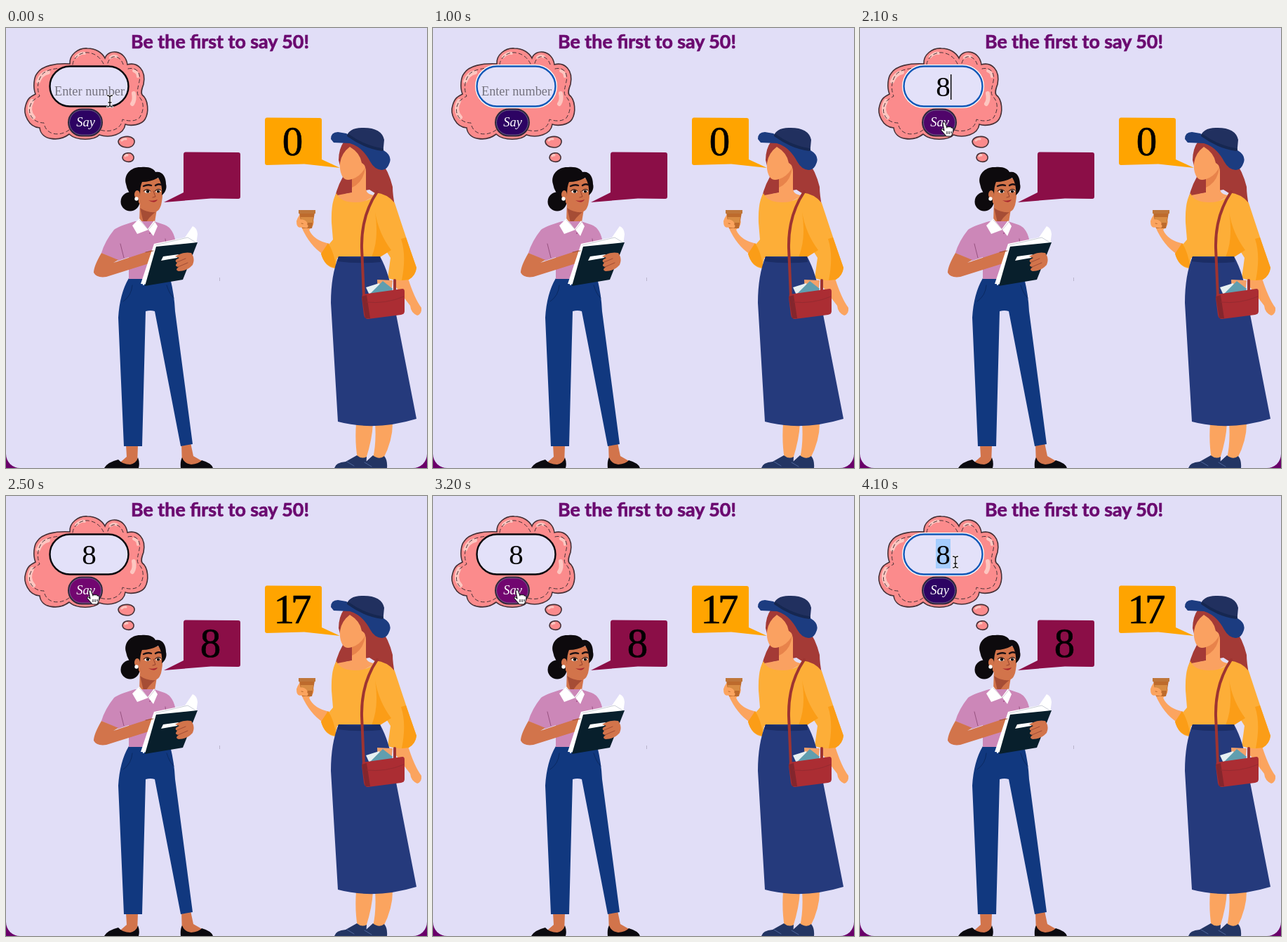
An HTML page for the animation above (4.2 s loop, 600 by 626 pixels).

```html
<!DOCTYPE html>
<html lang="en">
<head>
<meta charset="utf-8">
<title>Be the first to say 50!</title>
<style>
html, body { margin: 0; width: 100%; height: 100%; overflow: hidden; background: #6a006a; }
svg { display: block; width: 100vw; height: 100vh; }
text { text-anchor: middle; font-family: "Liberation Serif", "Times New Roman", serif; }
.title { font: 700 26.8px Lato, sans-serif; fill: #6b0a70; stroke: #6b0a70; stroke-width: .7px; }
.big { font-size: 59px; letter-spacing: -5px; stroke: #000; stroke-width: .6px; }
.line { fill: none; stroke-linecap: round; stroke-linejoin: round; }
</style>
</head>
<body>
<svg viewBox="0 0 600 626" preserveAspectRatio="none">
  <rect y="-30" width="600" height="656" rx="20" fill="#e1def7"/>
  <text class="title" x="305" y="29">Be the first to say 50!</text>
  <path d="M304.5 355v5" stroke="#b9b5cc"/>

  <g id="cloud" stroke="#453036" stroke-width="1.6" fill="#fb8b8c">
    <path d="M91 51C90 38 103 28 116 29C128 29 137 35 141 43C146 29 170 31 173 52C188 48 200 60 196 80C193 88 192 92 194 95C203 102 204 120 198 130C193 138 178 140 170 137C168 152 148 157 133 152C126 160 101 161 90 151C76 162 50 160 48 142C32 141 24 122 28 110C31 99 36 97 42 94C38 84 40 70 44 65C51 53 72 50 91 51Z"/>
    <path d="M160 161C162 154 176 152 182 158C185 163 181 170 173 170C165 170 160 166 160 161Z"/>
    <path d="M166 184C167 177 179 175 182 183C183 190 176 191 172 190C168 189 166 187 166 184Z"/>
    <g class="line" stroke="#fdc6c0" stroke-width="6">
      <path d="M46 76q4-11 14-13M37 104q-7 13 2 23M182 93q2 9-2 15"/>
      <path d="M100 41q6-6 12-5M149 42q4-4 9-1M182 61q6 2 6 8" stroke-width="4"/>
      <path d="M165 160q3-3 6-2M170 182q2-2 3-1" stroke-width="3"/>
    </g>
    <path class="line" stroke-width="1" stroke-dasharray="5 4" d="M95 52C96 42 106 34 117 35C126 36 134 41 139 51M145 50C149 36 164 38 168 55M174 58C186 55 194 64 189 80C187 90 186 94 190 98C198 107 196 119 190 128C184 133 175 133 166 130C164 145 148 149 134 145M90 145C78 154 57 154 54 135C39 135 31 123 34 112C36 104 42 100 48 97C43 85 46 75 50 68C56 59 70 57 87 57"/>
  </g>

  <rect id="ring" x="61" y="53" width="115" height="60" rx="30" fill="none" stroke="#fff" stroke-width="2"/>
  <rect id="field" x="62.5" y="54.5" width="112" height="57" rx="28.5" fill="#e3e1f9" stroke-width="2.4"/>
  <rect id="mark" x="108" y="61" width="21" height="42" fill="#a5cdfd"/>
  <text id="hint" x="119" y="96" font-size="18.3" fill="#75737f">Enter number</text>
  <text id="typed" x="118.5" y="97" font-size="41">8</text>
  <rect id="caret" y="66" width="1.4" height="36"/>
  <rect id="button" x="89" y="115.5" width="48" height="38" rx="19" stroke="#302a3c" stroke-width="2"/>
  <rect x="90.5" y="117" width="45" height="35" rx="17.5" fill="none" stroke="#77718d" stroke-width=".8"/>
  <text x="113.5" y="140" font-size="18.5" font-style="italic" fill="#fff">Say</text>

  <path fill="#8b0e47" d="M256 176.5L331 177Q334 177 334 180V240Q334 243 331 243L292 242.500L225 248L253 234V180Q253 176.500 256 176.500Z"/>
  <path fill="#ffa400" d="M372 127.500L447 128Q450 128 450 131V187L476 199L425 193.500L372 195Q369 195 369 192V131Q369 127.500 372 127.500Z"/>
  <text id="mine" class="big" x="289" y="229">8</text>
  <text id="theirs" class="big" x="406" y="181">0</text>

  <g id="reader">
    <path fill="#d2744b" d="M171 593H188L187 622H158L172 610ZM250 591L263 590L267 609L281 617L268 623H251Z"/>
    <path fill="#0b0a0f" d="M140 626Q144 618 160 614Q166 621 177 621Q186 619 188 611Q191 619 189 626ZM249 626Q248 616 251 611Q254 620 264 621Q275 620 279 615Q293 619 295 626Z"/>
    <path fill="#11387f" d="M175 356H234Q240 380 241 403L266 592L249 595L212 403Q206 401 199 403L194 595H168L160 412Q162 378 175 356Z"/>
    <path class="line" stroke="#0b2961" d="M180 366Q179 381 167 389M229 366Q233 379 239 384"/>

    <circle cx="177" cy="247" r="13.500" fill="#0d0a0d"/>
    <path fill="#d2744b" d="M191 244L190 277Q200 291 212 276L215 258Z"/>
    <path fill="#a64d35" d="M191 256Q201 263 213 262Q204 268 197 281Z"/>
    <path fill="#d2744b" d="M188 223Q195 211 220 214Q225 231 222 247Q220 262 210 262Q195 260 189 248Z"/>
    <path fill="#0d0a0d" d="M171 222C167 208 179 197 193 198C205 197 211 201 213 205C223 203 228 212 228 222C230 229 226 235 222 238C223 228 221 219 217 213Q206 219 194 219Q191 225 191 238L185 244Q173 235 171 222Z"/>
    <ellipse cx="187" cy="237" rx="4" ry="6" fill="#d2744b"/>
    <circle cx="186" cy="243" r="2.700" fill="#fff"/>
    <path class="line" stroke="#1c1014" stroke-width="2.400" d="M196 225Q202 222 207 224M213 224Q217 221 221 223"/>
    <path fill="#fff" d="M197 233q5-5 9 0q-5 4-9 0M213 233q4-5 8-1q-4 4-8 1"/>
    <circle cx="202" cy="232.500" r="2.200"/><circle cx="217" cy="232.500" r="2.100"/>
    <path class="line" stroke="#1c1014" d="M196 232q5-5 10 0M212 232q5-5 9-1"/>
    <path class="line" stroke="#96422d" d="M210 232l3 8l-4 1"/>
    <path fill="#a9272f" d="M203 245Q209 247 216 244Q212 251 203 245Z"/>

    <path fill="#cc87b8" d="M184 275Q160 282 154 287Q141 303 136 320L160 331L175 326V357H234L239 331L242 306Q239 285 226 280L211 275Z"/>
    <path class="line" stroke="#96517f" d="M163 307L168 327M227 300L228 307"/>
    <path fill="#d2744b" d="M136 320L160 330L153 334L202 318Q213 313 214 321L210 333L143 354Q129 356 125 348Q125 339 136 320Z"/>
    <path fill="#fff" d="M190 271L180 281L187 293L203 287L210 296L216 282L211 274L202 286Z"/>
    <path class="line" stroke="#c8bac8" stroke-width=".8" d="M190 273L203 287L212 276"/>
    <circle cx="205" cy="292" r="1" fill="#a4558b"/>
    <path fill="#fff" d="M211 307L255 298L266 282Q272 284 273 293L271 309L205 365L192 364Z"/>
    <path class="line" stroke="#bcc1cc" stroke-width=".8" d="M213 309L259 298L272 306"/>
    <path fill="#081f2c" d="M214 311L273 305L252 358L198 367Z"/>
    <path class="line" stroke="#fff" stroke-width="2" d="M212 310L196 365"/>
    <path fill="#fff" d="M224 325L246 322L244 327L221 331Z"/>
    <path fill="#d2744b" d="M241 325Q252 318 264 320Q270 328 266 337Q258 346 246 346Q240 344 246 340Q239 339 244 334Q238 331 247 327Z"/>
    <path class="line" stroke="#9a4833" stroke-width=".9" d="M244 333L256 328M245 340L259 334M199 319L210 317"/>
  </g>

  <g id="walker">
    <path fill="#fba45f" d="M499 562H523Q522 585 513 613H501Q497 590 499 562ZM526 562H551Q551 587 538 612H523Q528 590 526 562Z"/>
    <path fill="#233563" d="M468 626Q470 618 484 617L500 608Q507 614 514 610L513 626ZM496 626Q502 620 512 618L523 608Q532 615 539 609Q544 615 543 626Z"/>
    <path class="line" stroke="#5872a7" stroke-width=".8" d="M486 617L496 623M511 618L521 624"/>
    <path fill="#a43a36" d="M482 161Q474 172 474 188L480 212Q465 238 464 278Q476 261 484 236L518 230Q545 246 557 266Q551 241 551 226Q545 202 534 190L510 162Z"/>
    <path fill="#fba45f" d="M552 350L572 353Q582 385 592 398Q593 407 586 409Q577 405 576 395L556 369Z"/>
    <path fill="#fba45f" d="M421 283Q414 286 414 275Q417 265 423 263L438 272Q441 281 432 287Q438 302 461 307L452 322Q433 310 421 283Z"/>
    <path fill="#faa161" d="M490 169Q478 178 476 192Q475 204 480 212Q484 218 493 215V234L472 238Q476 253 500 253L527 238Q515 238 513 230V205Q513 195 507 192Q505 178 490 169Z"/>
    <path fill="#e8834b" d="M493 215Q506 211 512 198Q510 219 493 227Z"/>
    <path fill="#21305f" d="M484 157Q488 142 507 142Q535 141 539 159L537 180Q510 178 484 157Z"/>
    <path fill="#1c3c80" d="M463 158Q463 148 473 148L485 150Q510 168 538 174Q550 181 547 191Q543 203 535 202Q525 201 519 190Q508 169 490 164L467 163Z"/>
    <path class="line" stroke="#162751" stroke-width="4" d="M488 153Q510 169 536 173"/>

    <path fill="#fdae38" d="M471 235Q476 248 498 248Q520 248 526 234Q544 236 554 249Q570 298 585 341Q584 352 574 358Q558 361 544 356L548 327L533 303V327H472L469 342Q454 340 449 321L466 301L464 277Q463 247 471 235Z"/>
    <path fill="#fb9d17" d="M526 262Q531 292 549 316L533 326H521Q532 300 526 262ZM563 300Q571 324 564 359L574 358Q584 352 585 341L570 298ZM449 321L459 306Q467 317 471 341Q454 340 449 321Z"/>

    <path fill="#253a7c" d="M474 325H533Q547 350 552 387L585 556Q526 574 473 560L463 391Q463 352 474 325Z"/>
    <path fill="#1b2d65" d="M474 325Q501 329 533 325L534 333Q502 336 472 332Z"/>

    <path fill="#f3a16a" d="M529 358L551 359L549 378H530Z"/>
    <path fill="#e7f0f2" d="M513 369L532 363L539 381L519 382Z"/>
    <path fill="#609eaf" d="M519 378L537 360L551 371L546 382L522 385Z"/>
    <path class="line" stroke="#9e3431" stroke-width="4" d="M529 233Q506 267 507 313L510 383M554 359V378"/>
    <path fill="#ab2d33" d="M508 379L565 371Q568 371 568 375V403Q568 407 563 408L516 414Q511 414 510 408L507 384Z"/>
    <path fill="#84262d" d="M507 382L514 380L519 413L512 413Z"/>
    <path class="line" stroke="#962a30" d="M514 390Q541 393 567 382"/>

    <path fill="#bd6b2d" d="M418 263H440L436 285H422Z"/>
    <path fill="#bf763a" d="M417 259H441V264H417Z"/>
    <path fill="#d88c43" d="M420 269H438L437 277H421Z"/>
    <path class="line" stroke="#fba45f" stroke-width="5" d="M417 275Q424 274 427 278M420 281L428 282"/>
  </g>

  <g id="beam" class="line">
    <path d="M-3.500-8Q0-8 0-5Q0-8 3.500-8M0-5V6M-3.500 8Q0 8 0 5Q0 8 3.500 8M-2 2H2" stroke="#fff" stroke-width="3"/>
    <path d="M-3.500-8Q0-8 0-5Q0-8 3.500-8M0-5V6M-3.500 8Q0 8 0 5Q0 8 3.500 8M-2 2H2" stroke="#17151b" stroke-width="1.400"/>
  </g>
  <g id="hand" stroke="#15121b" stroke-width="1.100" stroke-linejoin="round">
    <path fill="#fff" d="M-1 10L-3 0Q-3-3 0-2L3 6Q3 3 6 5Q8 3 9 6Q12 5 12 9L11 14L9 18H2L-5 10Q-6 7-3 8Z"/>
    <path fill="none" d="M3 11V15M6 11V15M9 11V14"/>
  </g>
</svg>
<script>
const LOOP = 4200;
const $ = id => document.getElementById(id);
const show = (id, on) => $(id).setAttribute('visibility', on ? 'visible' : 'hidden');
const within = (t, a, b) => t >= a && t < b;
const mix = (a, b, p) => a + (b - a) * p;

// time, x, y
const route = [
  [0, 148, 104], [1700, 148, 104], [2100, 121, 136],
  [3300, 121, 136], [3600, 135, 97], [4000, 136, 94], [4200, 136, 94]
];
// time, hover amount
const hover = [[0, 0], [2000, 0], [2200, 1], [3500, 1], [3700, 0], [4200, 0]];

function sample(keys, t, col) {
  let i = 1;
  while (i < keys.length - 1 && t >= keys[i][0]) i++;
  const a = keys[i - 1], b = keys[i];
  return mix(a[col], b[col], (t - a[0]) / (b[0] - a[0]));
}

function draw(t) {
  const focus = within(t, 100, 2300) || t >= 3800;
  const typed = t >= 1100;
  const said = t >= 2300;
  const x = sample(route, t, 1), y = sample(route, t, 2);
  const over = y > 114;
  const pointer = t < 200 || t >= 1700;
  const glow = sample(hover, t, 1);
  const rgb = [[45, 114], [3, 6], [99, 112]].map(c => Math.round(mix(c[0], c[1], glow)));

  $('field').setAttribute('stroke', focus ? '#1158b7' : '#08080c');
  $('button').setAttribute('fill', `rgb(${rgb})`);
  show('ring', focus);
  show('hint', !typed);
  show('typed', typed);
  show('mark', t >= 4000);
  $('caret').setAttribute('x', typed ? 129 : 118);
  show('caret', within(t, 100, 600) || within(t, 1100, 1600) || within(t, 2100, 2300) || within(t, 3800, 4000));
  show('mine', said);
  $('theirs').textContent = said ? '17' : '0';

  show('beam', pointer && !over);
  show('hand', pointer && over);
  for (const id of ['beam', 'hand']) $(id).setAttribute('transform', `translate(${x} ${y})`);
}

const start = performance.now();
function tick(now) {
  draw(Math.max(0, now - start) % LOOP);
  requestAnimationFrame(tick);
}
draw(0);
requestAnimationFrame(tick);
</script>
</body>
</html>
```
